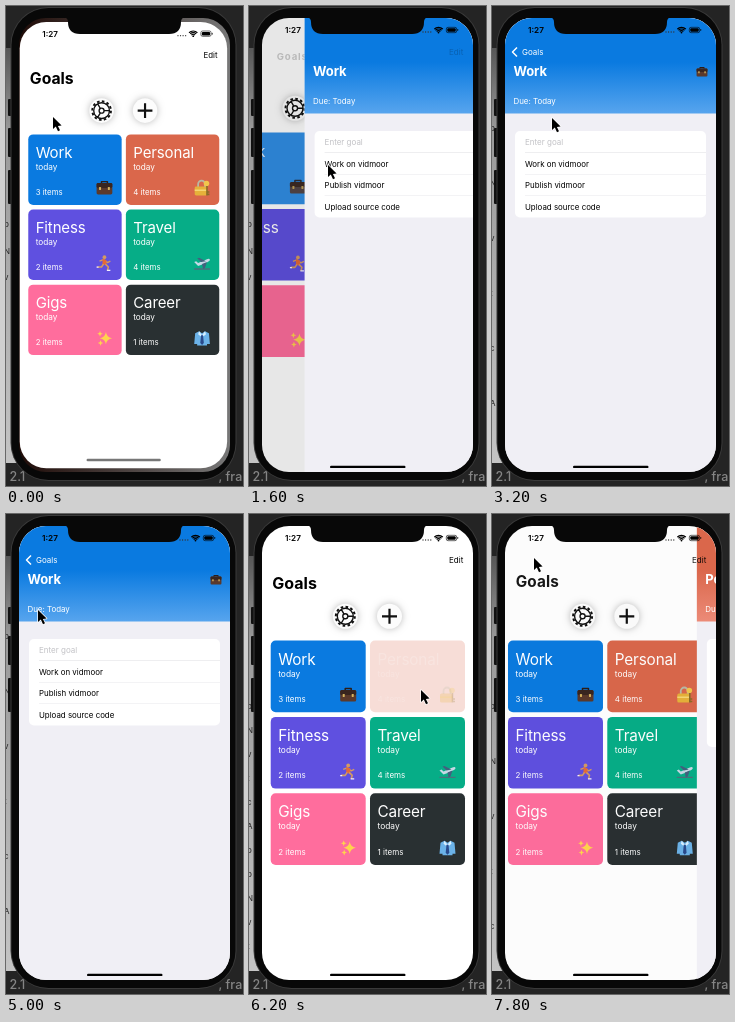
Animation, 237 px wide and 480 px high, one loop 8000 ms. Source, as an HTML page with a canvas:

```html
<!DOCTYPE html>
<html lang="en">
<head>
<meta charset="utf-8">
<title>Goals app</title>
<style>
  html, body { margin: 0; width: 100%; height: 100%; overflow: hidden; background: #222; }
  canvas { display: block; width: 237px; height: 480px; }
</style>
</head>
<body>
<canvas id="stage"></canvas>
<script>
const W = 237, H = 480, LOOP = 8000, STEP = 200;
const SCREEN = { x: 13, y: 12, w: 211, h: 454, r: 27 };
const canvas = document.getElementById('stage');
const c = canvas.getContext('2d');
const dpr = window.devicePixelRatio || 1;
canvas.width = W * dpr;
canvas.height = H * dpr;

const lists = [
  { name: 'Work', color: '#0a7ae0', light: '#58a5ee', count: 3, icon: briefcase,
    goals: ['Work on vidmoor', 'Publish vidmoor', 'Upload source code'] },
  { name: 'Personal', color: '#da674b', light: '#ec8b78', count: 4, icon: lock,
    goals: ['Clean grill', 'Get groceries', 'Garage cleanup', 'Lock the door'] },
  { name: 'Fitness', color: '#5f50e0', count: 2, icon: runner },
  { name: 'Travel', color: '#06ad87', count: 4, icon: plane },
  { name: 'Gigs', color: '#ff6d9d', count: 2, icon: sparkles },
  { name: 'Career', color: '#293032', count: 1, icon: shirt },
];

// Cursor tip: [time, x, y]
const cursorPath = [
  [0, 47, 111], [600, 54, 128], [1200, 79, 159], [2200, 79, 159], [3200, 60, 112],
  [4400, 42, 104], [5000, 32, 96], [5400, 31, 48], [5600, 60, 75], [6000, 168, 172],
  [6200, 172, 176], [6400, 160, 165], [7000, 27, 64], [7400, 30, 47], [7800, 42, 44], [8000, 44, 46],
];

// Each visit to a detail page: which list, when it opens and when it closes
const visits = [
  { list: lists[0], open: 1400, close: 5400 },
  { list: lists[1], open: 6200, close: 7500 },
];

const mix = (a, b, k) => a + (b - a) * k;
const clamp = v => Math.max(0, Math.min(1, v));
const settle = ms => ms <= 0 ? 0 : ms > 700 ? 1 : 1 - Math.exp(-ms / 125);

function text(str, x, y, size, color, weight = 400, spacing = 0) {
  c.font = `${weight} ${size}px Inter, "Open Sans", sans-serif`;
  c.letterSpacing = spacing + 'px';
  c.fillStyle = color;
  c.fillText(str, x, y);
}

function box(x, y, w, h, r, color) {
  c.beginPath();
  c.roundRect(x, y, w, h, r);
  c.fillStyle = color;
  c.fill();
}

function disc(x, y, r, color) {
  c.beginPath();
  c.arc(x, y, r, 0, 7);
  c.fillStyle = color;
  c.fill();
}

function shape(d, color) {
  c.fillStyle = color;
  c.fill(new Path2D(d));
}

function line(d, color, width) {
  c.strokeStyle = color;
  c.lineWidth = width;
  c.stroke(new Path2D(d));
}

function placed(x, y, scale, alpha, draw) {
  c.save();
  c.translate(x, y);
  c.scale(scale, scale);
  c.globalAlpha *= alpha;
  draw();
  c.restore();
}

// Icons live in a box from -8 to 8
function briefcase() {
  line('M-3-4V-6.5H3V-4', '#2c1c17', 1.5);
  box(-8, -5, 16, 11.5, 1.5, '#5b392b');
  box(-8, -5, 16, 5, 1.5, '#39251f');
  box(-5.5, -1, 2, 3, .4, '#d6b35e');
  box(3.5, -1, 2, 3, .4, '#d6b35e');
}
function lock() {
  line('M-4-1V-4A3.5 3.5 0 0 1 3-4V-1', '#b7b9a5', 1.8);
  box(-7.5, -1.5, 12.5, 9, 1.5, '#e6b13a');
  box(-7.5, 1.5, 12.5, 1.5, 0, '#f6d573');
  disc(4.5, -4.5, 2.8, '#f1c64c');
  line('M5-2V7.5M5 4H7.5M5 6.5H7.5', '#8a6c26', 1.6);
}
function runner() {
  disc(0, -6, 1.9, '#d39a63');
  line('M-5-2L-1-3.5L3-.5L6-2', '#d39a63', 1.4);
  shape('M-2-4.5L2-3L2 2L-2 1.5Z', '#e66a36');
  line('M-1 1L-3 4L-7 4M1 1L4 4L3 7.5', '#d39a63', 1.6);
  line('M-8 4.2H-6M2.5 7.5H6', '#f4efff', 1.3);
}
function plane() {
  line('M-8 6H8', '#4d6f7c', 1.4);
  shape('M-8-1L-6-2L-4 0L5-4Q8-5 8-3Q7-1-4 3Z', '#c6d8e5');
  shape('M-1-1L-5-5L-3-5.5L4-2ZM0 1L1 6L3 5L5-1Z', '#42617e');
}
function sparkles() {
  const star = (x, y, r) => placed(x, y, r, 1, () =>
    shape('M0-1Q.12-.12 1 0Q.12.12 0 1Q-.12.12-1 0Q-.12-.12 0-1', '#ffd34d'));
  star(1.5, 0, 6.2);
  star(-4.5, -4.5, 2.8);
  star(-4, 4.8, 2.8);
}
function shirt() {
  shape('M-3-7L-7-5L-8 6H-5V7.5H5V6H8L7-5L3-7L0-5Z', '#6bb2e8');
  shape('M-3-7L0-3L3-7L4-4L1.5-2L0-3L-1.5-2L-4-4Z', '#d8efff');
  shape('M-1-3H1L1.8 5L0 7L-1.8 5Z', '#294a8c');
}

function gear() {
  c.strokeStyle = '#111';
  c.lineWidth = 2;
  c.setLineDash([2.6, 2.37]);
  c.beginPath();
  c.arc(0, 0, 9.5, 0, Math.PI * 2);
  c.stroke();
  c.setLineDash([]);
  line('M8 0A8 8 0 1 1-8 0A8 8 0 1 1 8 0M2.5 0A2.5 2.5 0 1 1-2.5 0A2.5 2.5 0 1 1 2.5 0' +
    'M2.5 0H8M-1.25-2.2L-4-6.9M-1.25 2.2L-4 6.9', '#111', 1.4);
}

function roundButton(x, drawIcon) {
  c.save();
  c.shadowColor = '#0004';
  c.shadowBlur = 7 * dpr;
  disc(x, 102.3, 12.5, '#fcfcfc');
  c.restore();
  placed(x, 102.3, 1, 1, drawIcon);
}

function card(list, i, alpha) {
  const x = 21.7 + (i % 2) * 99.3, y = 126.5 + Math.floor(i / 2) * 76.4;
  placed(x, y, 1, alpha, () => {
    box(0, 0, 95, 71.7, 5, list.color);
    text(list.name, 7.5, 24, 15.3, '#fff', 400, -.15);
    text('today', 7.5, 36, 8.4, '#fff');
    text(list.count + ' items', 7.5, 61.5, 8, '#fff');
    placed(77.5, 54.5, 1, 1, list.icon);
  });
}

function goalsPage(p, pressed, pressedAlpha) {
  box(0, 0, W, H, 0, '#fff');
  c.save();
  c.translate(-63 * p, 0);
  roundButton(96.3, gear);
  roundButton(140.5, () => line('M-7.5 0H7.5M0-7.5V7.5', '#111', 2.2));
  lists.forEach((list, i) => card(list, i, list === pressed ? pressedAlpha : 1));
  c.restore();
  c.globalAlpha = 1 - p;
  text('Goals', mix(23.3, 29, p), mix(75, 49, p), mix(16, 8, p), '#000', 700, p);
  c.globalAlpha = 1;
  box(0, 0, W, H, 0, `rgba(0,0,0,${.12 * p})`);
}

function detailPage(list, p) {
  c.save();
  c.translate((1 - p) * SCREEN.w, 0);
  box(13, 12, 211, 454, 0, '#f0eff5');
  const shade = c.createLinearGradient(0, 56, 0, 108);
  shade.addColorStop(0, list.color);
  shade.addColorStop(1, list.light);
  box(13, 12, 211, 95.5, 0, shade);
  text(list.name, 21.5, 70, 13, '#fff', 700, -.1);
  text('Due: Today', 21.5, 98, 7.9, '#fff');
  placed(210, 66, .68, 1, list.icon);

  const row = 21.6;
  box(23, 125, 191, row * (list.goals.length + 1), 5, '#fff');
  text('Enter goal', 33, 138.8, 8, '#c2c2c6');
  list.goals.forEach((goal, i) => {
    const y = 125 + row * (i + 1);
    box(33, y - .3, 181, .6, 0, '#e8e8eb');
    text(goal, 33, y + 13.9, 7.9, '#000');
  });
  c.restore();

  c.globalAlpha = clamp((p - .82) / .18);
  line('M25 41.5L20.5 46L25 50.5', '#fff', 1.5);
  text('Goals', 30, 49, 8, '#fff');
  c.globalAlpha = 1;
}

function statusBar() {
  text('1:27', 36, 27, 8.2, '#000', 600);
  for (let i = 0; i < 4; i++) disc(174 + i * 2.6, 26, .65, '#333');
  for (const r of [2.6, 4.3, 6]) {
    c.beginPath();
    c.arc(189.5, 27.3, r, -2.36, -.78);
    c.strokeStyle = '#000';
    c.lineWidth = 1.2;
    c.stroke();
  }
  disc(189.5, 26.6, .9, '#000');
  c.beginPath();
  c.roundRect(197.3, 21.3, 10.4, 5.4, 1.7);
  c.lineWidth = .6;
  c.stroke();
  box(198.3, 22.2, 8.4, 3.6, 1, '#000');
  box(208.4, 23, .8, 2, .4, '#000');
}

function backdrop(t) {
  box(0, 0, W, H, 0, '#242424');
  const strip = c.createLinearGradient(0, 40, 0, 458);
  strip.addColorStop(0, '#555');
  strip.addColorStop(.2, '#999');
  strip.addColorStop(1, '#c4c4c4');
  box(0, 42, 30, 415, 0, strip);
  const dense = t >= 5600 && t < 7400;
  const first = t < 2600 ? 221 : t < 5600 ? 125 : 195;
  const gap = t < 2600 ? 26.5 : dense ? 24 : 55;
  const rows = t < 2600 ? 3 : dense ? 11 : 6;
  for (let i = 0; i < rows; i++) text('pNvtcAo'[i % 7], -2, first + i * gap, 8, '#222');
  text('2.1', 3.5, 475, 12.5, '#858585', 500);
  text(', fra', 212.5, 475, 12.5, '#858585', 500);
}

function phone() {
  [[93, 17], [122, 29], [164, 34]].forEach(([y, h]) => box(2, y, 4, h, 1, '#111'));
  box(4.5, 1, 226, 474, 38, '#3a3a3a');
  box(5.5, 2, 224, 472, 37, '#080808');
}

function notch() {
  shape('M58 11Q62 12 62 16Q62 28 74 28H163Q175 28 175 16Q175 12 179 11Z', '#080808');
}

function cursor(t) {
  const i = cursorPath.findIndex(k => k[0] > t);
  const [t0, x0, y0] = cursorPath[i - 1], [t1, x1, y1] = cursorPath[i];
  const k = (t - t0) / (t1 - t0);
  placed(mix(x0, x1, k), mix(y0, y1, k), 1, 1, () => {
    const arrow = 'M0 0V12L2.8 9.5L5 14.2L7 13.2L4.9 8.9L8.6 8.6Z';
    line(arrow, '#fff', 1.4);
    shape(arrow, '#000');
  });
}

// The app zooms in from slightly below full size when it launches
function launchZoom() {
  const behind = c.createLinearGradient(SCREEN.x, 0, SCREEN.x + SCREEN.w, 0);
  behind.addColorStop(0, '#200c08');
  behind.addColorStop(1, '#777');
  box(SCREEN.x, SCREEN.y, SCREEN.w, SCREEN.h, SCREEN.r, behind);
  c.translate(55, 240);
  c.scale(.983, .983);
  c.translate(-55, -240);
}

function draw(t) {
  c.setTransform(dpr, 0, 0, dpr, 0, 0);
  c.lineJoin = 'round';
  backdrop(t);
  phone();

  const visit = visits.find(v => t >= v.open && t < v.close + 700);
  const p = visit ? settle(t - visit.open) * (1 - settle(t - visit.close)) : 0;
  const launching = t < STEP;

  c.save();
  if (launching) launchZoom();
  c.beginPath();
  c.roundRect(SCREEN.x, SCREEN.y, SCREEN.w, SCREEN.h, SCREEN.r);
  c.clip();
  goalsPage(p, visit?.list, visit ? mix(.22, 1, settle(t - visit.open)) : 1);
  if (p > 0) detailPage(visit.list, p);
  c.globalAlpha = 1 - p;
  text('Edit', 200, 49, 8, '#000');
  c.globalAlpha = 1;
  statusBar();
  box(81, launching ? 456.5 : 459.7, 75.5, 2.4, 1.2, launching ? '#777' : '#000');
  c.restore();

  notch();
  cursor(t);
}

function tick() {
  const t = performance.now() % LOOP;
  draw(Math.floor(t / STEP) * STEP);
  requestAnimationFrame(tick);
}
tick();
</script>
</body>
</html>
```
